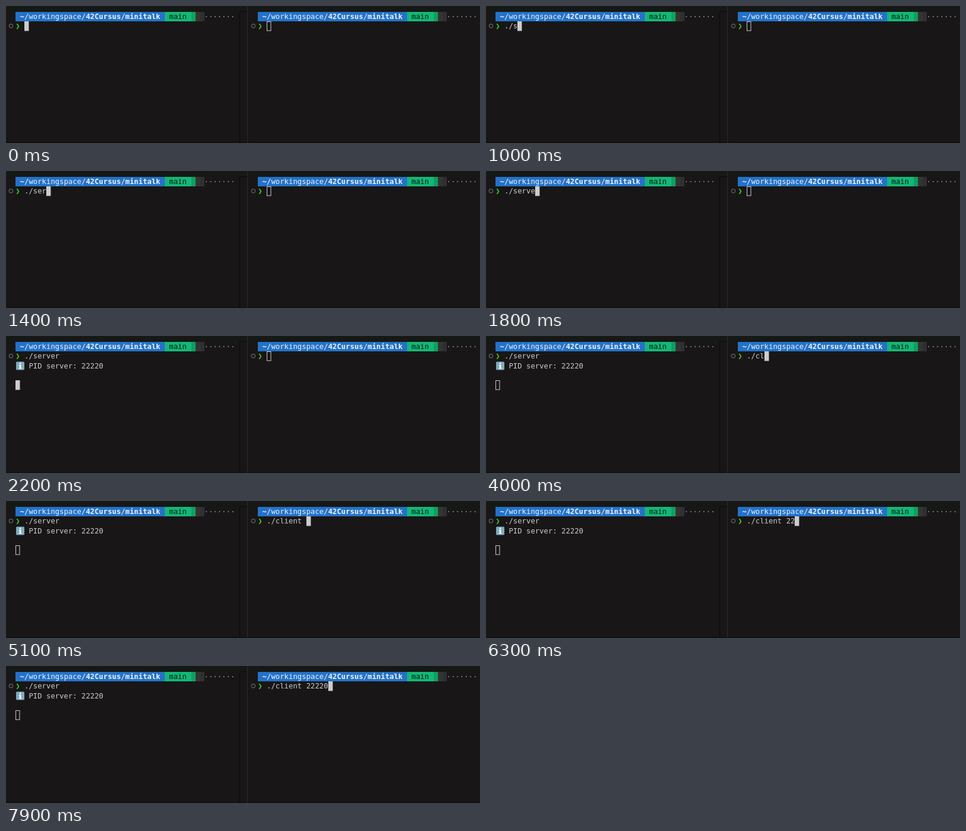
An HTML page for the animation above (8000 ms loop, 800x232 px).

```html
<!DOCTYPE html>
<html lang="en">
<head>
<meta charset="utf-8">
<title>Terminal session</title>
<style>
  html, body { margin: 0; width: 100%; height: 100%; overflow: hidden; background: #181617; }
  svg { display: block; }
  text { font: 12.3px "DejaVu Sans Mono", monospace; fill: #ccc; white-space: pre; }
  .b { font-weight: bold; }
  .path { fill: #eef3f8; }
  .cursor { fill: #ccc; stroke: #ccc; }
  .cursor.idle { fill: none; }
</style>
</head>
<body>
<svg width="800" height="232" viewBox="0 0 800 232">
  <defs>
    <pattern id="shade" width="2" height="2" patternUnits="userSpaceOnUse">
      <path d="M0 0h1v1h-1zM1 1h1v1h-1z" fill="#484848"/>
    </pattern>
    <g id="prompt">
      <path fill="#2472c8" d="M16 10h252v16h-252z"/>
      <path fill="#12b877" d="M268 10h45v16h-45z"/>
      <path fill="#0e9f60" d="M313 10h7v16h-7z"/>
      <path fill="#343434" d="M320 10h8v16h-8z"/>
      <path fill="url(#shade)" d="M328 10h7v16h-7z"/>
      <text class="path" x="23.6" y="22"><tspan class="b">~</tspan>/workingspace/<tspan class="b">42Cursus</tspan>/<tspan class="b">minitalk</tspan></text>
      <text x="275.3" y="22" style="fill:#06150f">main</text>
      <text x="334.5" y="22" style="fill:#999">·······</text>
      <circle cx="8.4" cy="33.7" r="3.1" fill="none" stroke="#666" stroke-width="1.2"/>
      <text class="b" x="16.2" y="38.3" style="fill:#42d422">❯</text>
    </g>
  </defs>

  <path fill="#161815" d="M0 0h800v10h-800z"/>
  <path fill="#121112" d="M0 230h800v2h-800z"/>
  <path fill="none" stroke="#080808" d="M407 9.5h-12.5v222.5"/>
  <path stroke="#2b2b2b" d="M407.5 0v232"/>

  <use href="#prompt"/>
  <use href="#prompt" x="409"/>
  <text id="leftText" x="31" y="38.3"></text>
  <text id="rightText" x="440" y="38.3"></text>

  <g id="output">
    <rect x="17" y="43.5" width="14" height="14" rx="1.5" fill="#7fa9bd"/>
    <path fill="#fff" d="M22.8 45.3h2.6v2.2h-2.6zM21.8 48.8h3.6v5.2h1.2v1.6h-5v-1.6h1.2v-3.6h-1z"/>
    <text x="38.4" y="54.6">PID server: 22220</text>
  </g>
  <rect id="leftCursor" class="cursor" width="6.5" height="15.3"/>
  <rect id="rightCursor" class="cursor" width="6.5" height="15.3"/>
</svg>
<script>
const LOOP = 8000, CELL = 7.4;
const ENTER = 2200, FOCUS = 2900;
const [leftText, rightText, output, leftCursor, rightCursor] =
  ['leftText', 'rightText', 'output', 'leftCursor', 'rightCursor']
    .map(id => document.getElementById(id));

// One keystroke time per character.
const server = { text: './server', keys: [700, 800, 1000, 1100, 1300, 1700, 1800, 2100] };
const client = {
  text: './client 22220',
  keys: [3600, 3700, 3900, 4000, 4800, 4800, 4900, 5100, 5100, 6100, 6300, 7000, 7800, 7900]
};

const typed = ({ text, keys }, t) => text.slice(0, keys.filter(k => k <= t).length);

function placeCursor(el, x, y, active) {
  el.setAttribute('x', Math.round(x) + 0.5);
  el.setAttribute('y', y);
  el.classList.toggle('idle', !active);
}

function render(t) {
  const left = typed(server, t), right = typed(client, t);
  const running = t >= ENTER, rightActive = t >= FOCUS;
  leftText.textContent = left;
  rightText.textContent = right;
  output.style.display = running ? '' : 'none';
  placeCursor(leftCursor, running ? 16 : 31 + left.length * CELL, running ? 75.5 : 26.5, !rightActive);
  placeCursor(rightCursor, 440 + right.length * CELL, 26.5, rightActive);
}

const start = performance.now();
function tick() {
  render((performance.now() - start) % LOOP);
  requestAnimationFrame(tick);
}
tick();
</script>
</body>
</html>
```
